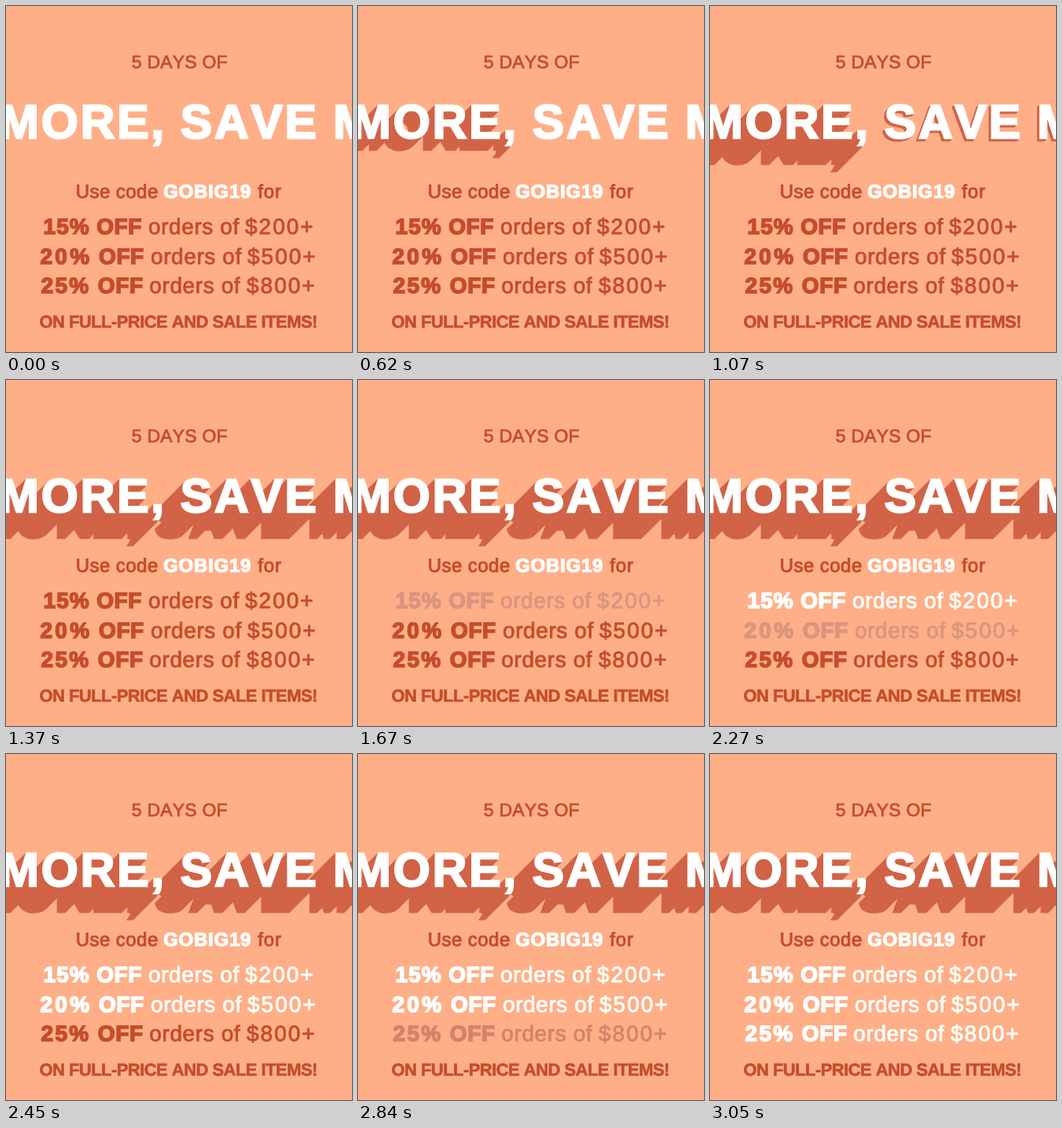
Animation of 440 by 440 pixels, one loop 4.2 s. Source, as an HTML page:

```html
<!DOCTYPE html>
<html lang="en">
<head>
<meta charset="utf-8">
<title>5 Days Of Savings</title>
<style>
  html, body { margin: 0; width: 100%; height: 100%; overflow: hidden; background: #ffaf87; }
  svg { display: block; width: 440px; height: 440px; color: #c44d2c; }
  text {
    font-family: "Liberation Sans", Arial, sans-serif;
    font-kerning: none;
    text-rendering: geometricPrecision;
    fill: currentColor;
    stroke: currentColor;
    white-space: pre;
  }
  .bold { font-weight: 700; }
  .white { color: #fff; }
  .shade { color: #d16347; }
</style>
</head>
<body>
<svg id="stage" viewBox="0 0 440 440"></svg>
<script>
const LOOP = 4200, STEP = 30, DEPTH = 33;
const DARK = [196, 77, 44];
const stage = document.getElementById("stage");

function add(tag, parent, attrs = {}) {
  const el = document.createElementNS("http://www.w3.org/2000/svg", tag);
  for (const key in attrs) el.setAttribute(key, attrs[key]);
  parent.append(el);
  return el;
}

function label(parent, str, x, y, size, spacing, weight, cls = "") {
  const el = add("text", parent, {
    x, y, "font-size": size, "letter-spacing": spacing, "stroke-width": weight, class: cls
  });
  el.textContent = str;
  return el;
}

const headline = (parent, str, x) => label(parent, str, x, 168.4, 60.5, 2.8, 2.4, "bold");

// Headline: each part is extruded down and to the left.
const parts = [
  { start: 500, words: [["MORE,", -8.4]] },
  { start: 1070, words: [["SAVE", 221.8], ["MORE", 416]] }
];
const shade = add("g", stage, { class: "shade" });
const face = add("g", stage, { class: "white" });
for (const part of parts) {
  part.layers = [];
  for (let d = 1; d <= DEPTH; d++) {
    const layer = add("g", shade, { transform: `translate(${-d} ${d})` });
    part.words.forEach(([str, x]) => headline(layer, str, x));
    part.layers.push(layer);
  }
  part.words.forEach(([str, x]) => headline(face, str, x));
}

label(stage, "5 DAYS OF", 159.8, 79, 23, 0.2, 0.8);
label(stage, "Use code", 88.7, 244, 24, 0.45, 1);
label(stage, "GOBIG19", 200.2, 244, 24, 0.75, 1.2, "bold white");
label(stage, "for", 320.2, 244, 24, 0.9, 1);
label(stage, "ON FULL-PRICE AND SALE ITEMS!", 42.4, 408.8, 22, -0.54, 0.6, "bold");

// Offers: start, baseline, percent, its x and spacing, x of OFF, orders and amount.
const offers = [
  [1580, 290, "15%", 47.5, 1.1, 115.2, 181, "$200+", 304],
  [2180, 328, "20%", 43.6, 3.2, 118, 184, "$500+", 307],
  [2780, 365, "25%", 44.6, 2.3, 116.8, 182.3, "$800+", 306]
].map(([start, y, pct, pctX, gap, offX, ordersX, sum, sumX]) => {
  const group = add("g", stage);
  label(group, pct, pctX, y, 28, gap, 1.6, "bold");
  label(group, "OFF", offX, y, 28, 0.6, 1.6, "bold");
  label(group, "orders of", ordersX, y, 28, 0.6, 0.9);
  label(group, sum, sumX, y, 28, 2, 0.9);
  return { start, group };
});

function progress(t, start, steps) {
  const n = Math.floor((t - start) / STEP) + 1;
  return Math.min(Math.max(n / steps, 0), 1);
}

function draw(t) {
  for (const { start, layers } of parts) {
    const depth = Math.round(progress(t, start, 11) * DEPTH);
    layers.forEach((layer, i) => { layer.style.display = i < depth ? "" : "none"; });
  }
  for (const { start, group } of offers) {
    const p = progress(t, start, 10);
    const rgb = DARK.map(c => Math.round(c + (255 - c) * p));
    group.style.color = `rgb(${rgb})`;
  }
}

const origin = performance.now();
function tick() {
  draw((performance.now() - origin) % LOOP);
  requestAnimationFrame(tick);
}
tick();
</script>
</body>
</html>
```
